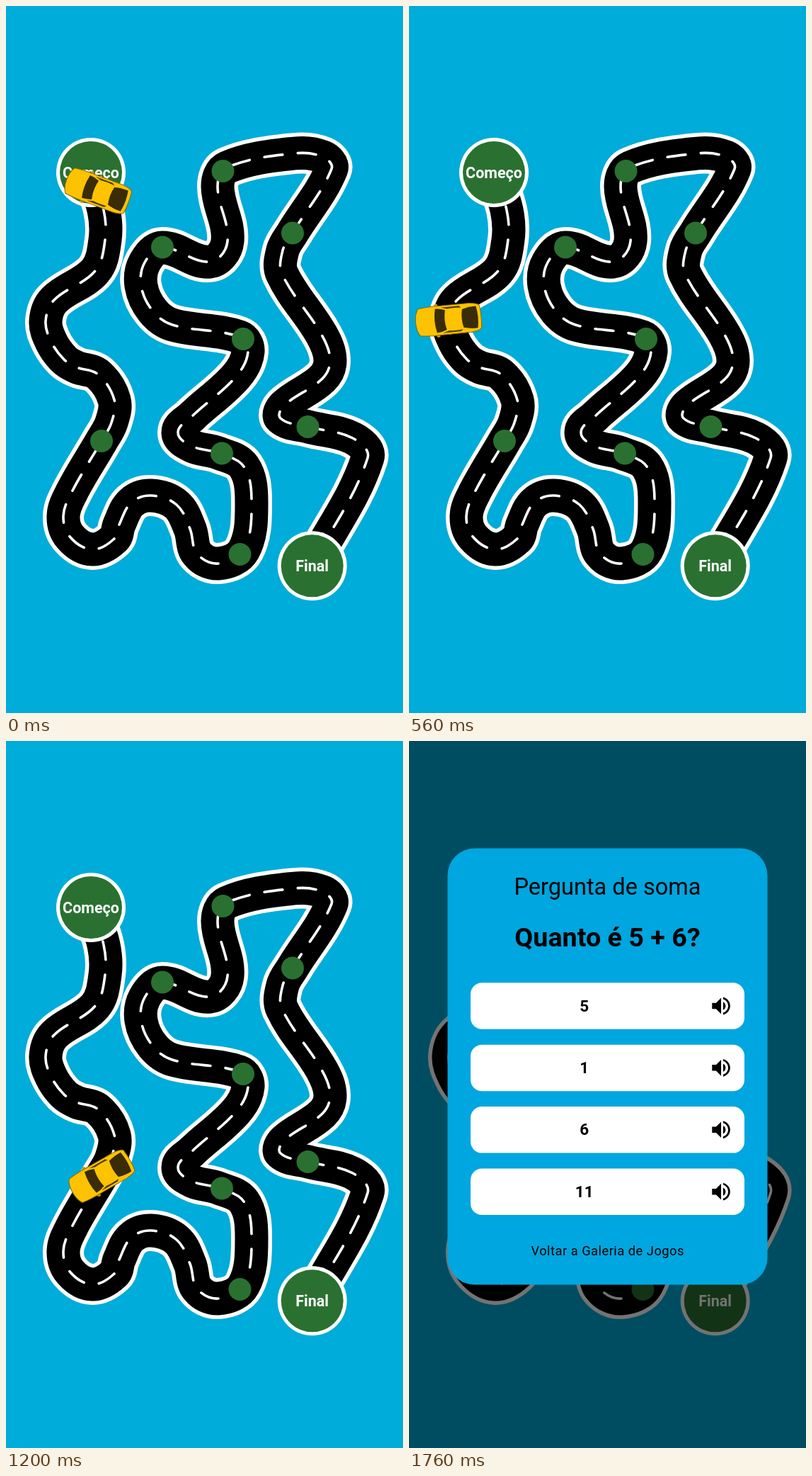
Animation of 561x998 px, one loop 1840 ms. Source, as an HTML page:

```html
<!DOCTYPE html>
<html lang="pt">
<head>
<meta charset="utf-8">
<title>Pista de soma</title>
<style>
  html, body { margin: 0; width: 100%; height: 100%; overflow: hidden; background: #00acd9; }
  svg { display: block; width: 100%; height: 100%; }
  text { font-family: Roboto, "Noto Sans", sans-serif; text-anchor: middle; }
  .road { fill: none; stroke-linecap: round; stroke-linejoin: round; }
  .sign { font-size: 21.5px; font-weight: 700; fill: #fff; }
  .answer { font-size: 22.5px; font-weight: 700; }
</style>
</head>
<body>
<svg viewBox="0 0 561 998">
  <defs>
    <path id="speaker" d="M3 9v6h4l5 5V4L7 9H3zm13.5 3c0-1.77-1.02-3.29-2.5-4.03v8.05c1.48-.73 2.5-2.25 2.5-4.02zM14 3.23v2.06c2.89.86 5 3.54 5 6.71s-2.11 5.85-5 6.71v2.06c4.01-.91 7-4.49 7-8.77s-2.99-7.86-7-8.77z"/>
  </defs>
  <rect width="561" height="998" fill="#00acd9"/>
  <path class="road" stroke="#fff" stroke-width="58"/>
  <path class="road" stroke="#000" stroke-width="47"/>
  <path class="road" id="line" stroke="#fff" stroke-width="3.6" stroke-dasharray="26 21.4" stroke-dashoffset="-51"/>
  <g id="stops" fill="#2a7131"></g>
  <g id="car">
    <path d="M-20 -21l3 -3 3 1v4zM-20 21l3 3 3 -1v-4z" fill="#c99700"/>
    <path d="M-42 -19Q-30 -21 -10 -20.5H30Q43 -19.5 45 -16Q47 0 45 16Q43 19.500 30 20.500H-10Q-30 21 -42 19Q-47 12 -47 0T-42 -19z" fill="#fdc300" stroke="#8a6a00"/>
    <path d="M-18 -17Q-11 -17 -4 -14Q-7.500 0 -4 14Q-11 17 -18 17Q-22 0 -18 -17z" fill="#3a2c05"/>
    <path d="M-10 -18H16L19 -15.500Q6 -16.500 -1 -15.500zM-10 18H16L19 15.500Q6 16.500 -1 15.500z" fill="#4a3903"/>
    <path d="M20 -13Q30 -16 40 -15.500Q43 0 40 15.500Q30 16 20 13Q17 0 20 -13z" fill="#3a2c05"/>
  </g>
  <rect id="shade" width="561" height="998"/>
  <g id="dialog">
    <rect x="54.500" y="151.500" width="452" height="616" rx="38" fill="#00a6df"/>
    <text x="280.500" y="217" font-size="32.500">Pergunta de soma</text>
    <text x="280.500" y="290" font-size="37.700" font-weight="700">Quanto é 5 + 6?</text>
    <g id="answers"></g>
    <text x="280.700" y="726" font-size="18.300" letter-spacing=".5">Voltar a Galeria de Jogos</text>
  </g>
</svg>
<script>
const LOOP = 1840, STEP = 80, DRIVE = 1200;
const $ = id => document.getElementById(id);
const clamp = v => Math.min(1, Math.max(0, v));
const points = s => s.split(',').map(p => p.trim().split(' ').map(Number));

// Bends of the road, from start to finish.
const bends = points(`120 235,138 288,140 330,126 374,68 415,56 445,64 474,82 499,100 510,
  130 520,153 556,149 588,135 614,93 686,81 720,91 750,122 767,153 752,160 732,177 701,
  205 691,241 704,260 738,270 773,300 787,336 768,347 700,336 650,300 631,262 621,
  243 602,262 580,325 523,342 488,330 467,235 450,207 430,191 395,196 362,221 341,
  288 361,313 332,299 255,312 228,408 208,448 213,460 230,405 320,391 345,390 378,
  446 464,458 500,447 526,393 564,388 582,427 594,490 610,511 638,432 790`);

// Each tangent runs parallel to the chord between the two neighbours.
function smooth(pts) {
  const tangents = pts.map((p, i) => {
    const [ax, ay] = pts[i - 1] || p, [bx, by] = pts[i + 1] || p;
    const d = Math.hypot(bx - ax, by - ay);
    return [(bx - ax) / d, (by - ay) / d];
  });
  let d = 'M' + pts[0];
  for (let i = 1; i < pts.length; i++) {
    const a = pts[i - 1], b = pts[i];
    const k = Math.hypot(b[0] - a[0], b[1] - a[1]) * 0.35;
    d += `C${a.map((v, j) => v + tangents[i - 1][j] * k)} ${b.map((v, j) => v - tangents[i][j] * k)} ${b}`;
  }
  return d;
}

const curve = smooth(bends);
document.querySelectorAll('.road').forEach(p => p.setAttribute('d', curve));
const line = $('line');

function lengthAt(x, y) {
  let best = 0, min = Infinity;
  for (let s = 0; s < line.getTotalLength(); s++) {
    const p = line.getPointAtLength(s), d = Math.hypot(p.x - x, p.y - y);
    if (d < min) { min = d; best = s; }
  }
  return best;
}

const disc = (x, y, r, fill = '') => `<circle cx="${x}" cy="${y}" r="${r}" ${fill}/>`;
const sign = (x, y, label) => disc(x, y, 49, 'fill="#fff"') + disc(x, y, 44) +
  `<text class="sign" x="${x}" y="${y + 7.8}">${label}</text>`;
const stops = points('135 614,330.5 774,305 631.5,335 470,221 340.5,306.5 233,405 320.5,426.5 594');
$('stops').innerHTML = stops.map(([x, y]) => disc(x, y, 16)).join('') +
  sign(120, 235, 'Começo') + sign(432.7, 790.3, 'Final');

$('answers').innerHTML = [5, 1, 6, 11].map((n, i) => {
  const y = 341.3 + i * 87.4;
  return `<rect x="87" y="${y}" width="387" height="65.500" rx="16" fill="#fff"/>
    <text class="answer" x="247.700" y="${y + 40.2}">${n}</text>
    <use href="#speaker" transform="translate(424 ${y + 15.6}) scale(1.42)"/>`;
}).join('');

const from = lengthAt(129, 261), to = lengthAt(...stops[0]);

function draw(t) {
  // Nearly steady speed, a touch faster in the first half.
  const u = clamp(t / DRIVE);
  const s = from + (to - from) * (u + 0.03 * Math.sin(Math.PI * u) ** 2);
  const p = line.getPointAtLength(s), a = line.getPointAtLength(s - 1), b = line.getPointAtLength(s + 1);
  const turn = 90 - Math.atan2(b.y - a.y, b.x - a.x) * 180 / Math.PI;
  $('car').setAttribute('transform', `translate(${p.x} ${p.y}) rotate(${turn})`);

  const left = 1 - clamp((t - DRIVE - 10) / 120);
  $('shade').setAttribute('opacity', 0.55 * (1 - left ** 3));
  $('dialog').setAttribute('opacity', 1 - left ** 2);
}

const begin = performance.now();
function tick() {
  const t = (performance.now() - begin) % LOOP;
  draw(Math.floor(t / STEP) * STEP);
  requestAnimationFrame(tick);
}
tick();
</script>
</body>
</html>
```
